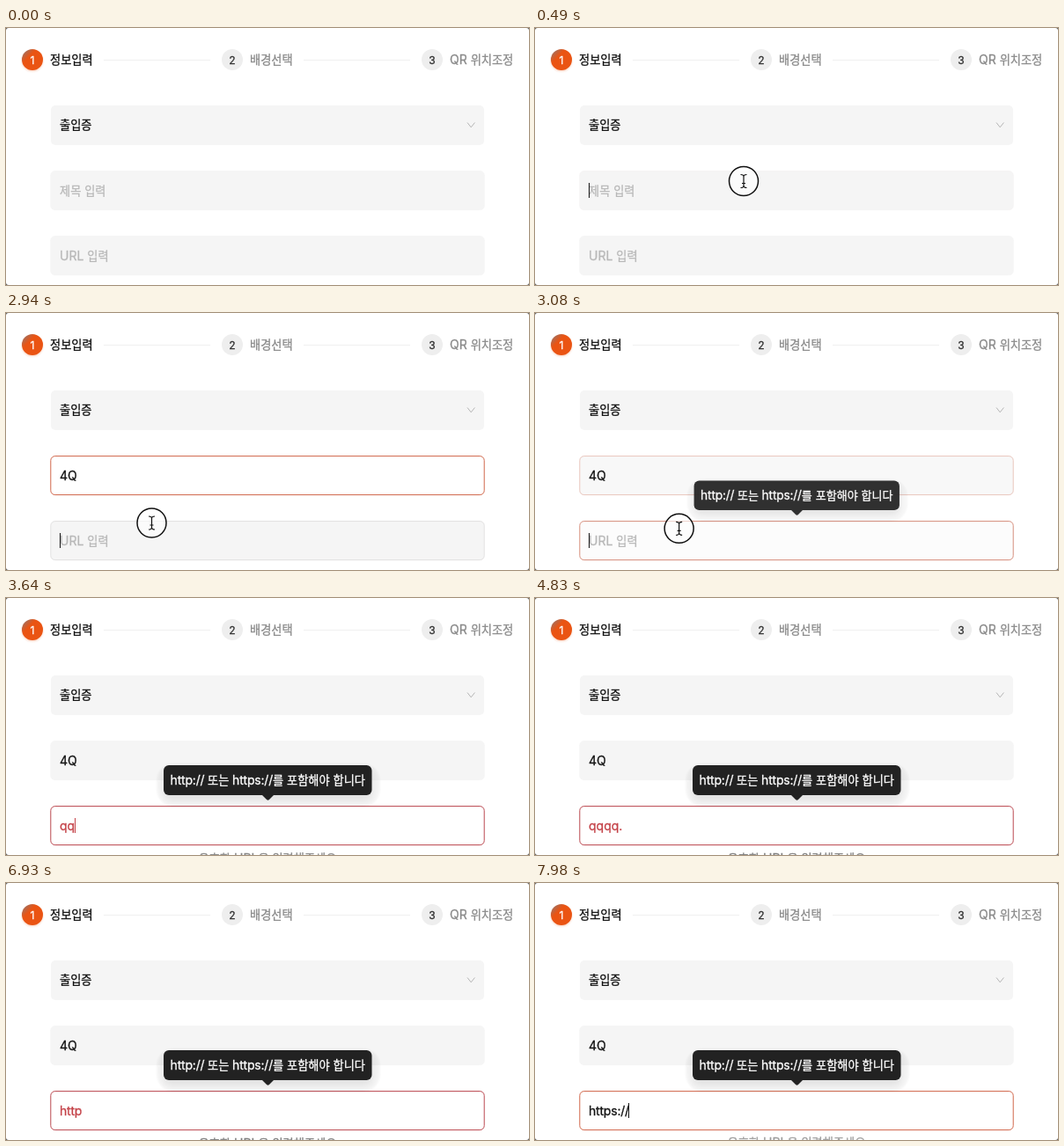
An HTML page for the animation above (8 s loop, 594 by 292 pixels).

```html
<!DOCTYPE html>
<html lang="ko">
<head>
<meta charset="utf-8">
<title>정보입력</title>
<style>
  html, body { margin: 0; width: 100%; height: 100%; overflow: hidden; background: #555; }
  svg { display: block; width: 594px; height: 292px; }
  text { font: 14px Inter, "Noto Sans CJK KR", sans-serif; white-space: pre; stroke-width: .3px; }
  .ko { font-family: "Noto Sans CJK KR", "Noto Sans CJK", sans-serif; font-size: 13.2px; }
  .url { letter-spacing: -0.2px; }
</style>
</head>
<body>
<svg id="stage" viewBox="0 0 594 292" xmlns="http://www.w3.org/2000/svg">
  <defs>
    <filter id="soft" x="-20%" y="-60%" width="140%" height="220%"><feGaussianBlur stdDeviation="4"/></filter>
    <filter id="glow" x="-50%" y="-50%" width="200%" height="200%"><feGaussianBlur stdDeviation="1"/></filter>
    <linearGradient id="badge" x1="0" y1="0" x2="1" y2="1">
      <stop offset=".1" stop-color="#a07060"/>
      <stop offset=".35" stop-color="#ea5413"/>
    </linearGradient>
  </defs>
  <rect width="594" height="292" rx="3" fill="#fff"/>
  <g id="steps"></g>
  <rect x="51" y="88" width="492" height="45" rx="5" fill="#f5f5f5"/>
  <path d="M524 107.5 L528.2 112.8 L532.4 107.5" fill="none" stroke="#b5b5b5"/>
  <g id="form"></g>
  <g id="tooltip">
    <rect x="171" y="188" width="254" height="49" rx="20" fill="#000" opacity=".035" filter="url(#glow)"/>
    <rect x="179" y="196" width="237" height="34" rx="8" fill="#000" opacity=".08" filter="url(#soft)"/>
    <path d="M290 223 H305 L299 229 Q297.5 230.4 296 229 Z" fill="#222"/>
    <rect x="179" y="190" width="236.5" height="34" rx="6" fill="#222"/>
  </g>
  <g id="cursor">
    <circle r="16.5" fill="#fff" fill-opacity=".6" stroke="#111" stroke-width="1.5"/>
    <path d="M-3.5 -7.5 Q0 -7.5 0 -5 Q0 -7.5 3.5 -7.5 M0 -5.5 V5.5 M-3.5 7.5 Q0 7.5 0 5 Q0 7.5 3.5 7.5 M-2 2.5 H2" fill="none" stroke="#111" stroke-width="1.2"/>
  </g>
</svg>
<script>
const LOOP = 8000;
const GRAY = [245, 245, 245], WHITE = [255, 255, 255], HOVER = [226, 226, 226];
const ORANGE = [208, 100, 72], RED = [186, 70, 78], INK = [20, 20, 20], RED_TEXT = [196, 66, 72];

const byId = id => document.getElementById(id);
const clamp = v => Math.max(0, Math.min(1, v));
const ramp = (t, from, to) => clamp((t - from) / (to - from));
const easeOut = p => 1 - (1 - p) ** 3;
const easeInOut = p => p * p * (3 - 2 * p);
const lerp = (a, b, p) => a + (b - a) * p;
const mix = (a, b, p) => a.map((v, i) => lerp(v, b[i], p));
const rgb = c => `rgb(${c.map(Math.round)})`;
const show = (node, on) => node.setAttribute('visibility', on ? 'visible' : 'hidden');

function make(parent, tag, attrs = {}) {
  const node = document.createElementNS('http://www.w3.org/2000/svg', tag);
  set(node, attrs);
  return parent.appendChild(node);
}

function set(node, attrs) {
  for (const name in attrs) node.setAttribute(name, attrs[name]);
}

// Hangul and Latin runs get their own font and size.
function setText(node, string) {
  if (node.dataset.value === string) return;
  node.dataset.value = string;
  node.replaceChildren();
  for (const run of string.match(/[가-힣]+|[^가-힣]+/g) || []) {
    const kind = /[가-힣]/.test(run) ? 'ko' : /http/.test(run) ? 'url' : '';
    make(node, 'tspan', { class: kind }).textContent = run;
  }
}

// The thin outline gives the type a medium weight.
function label(parent, string, x, y, color, anchor = 'start') {
  const node = make(parent, 'text', { x, y, fill: color, stroke: color, 'text-anchor': anchor });
  setText(node, string);
  return node;
}

function addStep(number, name, x, active) {
  const steps = byId('steps');
  if (active) make(steps, 'circle', { cx: x, cy: 37.2, r: 12, fill: '#e8540f', opacity: .25, filter: 'url(#glow)' });
  make(steps, 'circle', { cx: x, cy: 36, r: 12, fill: active ? 'url(#badge)' : '#eeeeee' });
  const digit = label(steps, number, x, 41, active ? '#fff' : '#333', 'middle');
  digit.style.fontSize = '12px';
  label(steps, name, x + 20, 40.6, active ? '#111' : '#8a8a8a');
}

function addField(y, hint) {
  const form = byId('form');
  return {
    box: make(form, 'rect', { x: 50.8, y: y + .6, width: 492.4, height: 44, rx: 5 }),
    hint: label(form, hint, 61, y + 27.6, '#b8b8b8'),
    value: make(form, 'text', { x: 61, y: y + 28 }),
    caret: make(form, 'rect', { y: y + 14, width: 1, height: 17 })
  };
}

addStep('1', '정보입력', 30, true);
addStep('2', '배경선택', 257, false);
addStep('3', 'QR 위치조정', 484, false);
for (const x of [111, 338]) make(byId('steps'), 'rect', { x, y: 36, width: 121, height: 1, fill: '#f0f0f0' });
label(byId('form'), '출입증', 61, 115.3, '#111');

const titleField = addField(162, '제목 입력');
const urlField = addField(236, 'URL 입력');
const message = label(byId('form'), '', 297, 301, '#808080', 'middle');
label(byId('tooltip'), 'http:// 또는 https://를 포함해야 합니다', 297.3, 212, '#fff', 'middle');

const titleKeys = [[1190, '4'], [1820, '4Q']];
const urlKeys = [
  [3360, 'q'], [3570, 'qq'], [3780, 'qqq'], [3990, 'qqqq'], [4340, 'qqqq.'],
  [4970, 'qqqq'], [5110, 'qq'], [5180, 'q'], [5320, ''],
  [6020, 'h'], [6230, 'htt'], [6440, 'http'], [7280, 'https'],
  [7490, 'https:'], [7700, 'https:/'], [7840, 'https://']
];
const caretGaps = [[1050, 1190], [1750, 1820], [2310, 2800], [4830, 5320], [5880, 6020], [6930, 7280]];
const cursorPaths = [
  [[70, 300, 234], [490, 237, 174], [700, 237, 176]],
  [[2520, 237, 176], [2590, 228, 167], [2940, 165.5, 238.5], [3150, 163, 247]]
];

const typed = (keys, t) => keys.reduce((text, [at, next]) => t >= at ? next : text, '');

function drawField(field, text, state) {
  const ink = rgb(state.ink);
  setText(field.value, text);
  set(field.value, { fill: ink, stroke: ink });
  show(field.hint, !text);
  set(field.box, { fill: rgb(state.fill), stroke: rgb(state.border) });
  show(field.caret, state.caret);
  const width = text ? field.value.getComputedTextLength() : 0;
  set(field.caret, { x: Math.floor(61 + width), fill: ink });
}

function drawCursor(t) {
  const path = t < 1190 ? cursorPaths[0] : cursorPaths[1];
  show(byId('cursor'), (t >= 70 && t < 1190) || (t >= 2520 && t < 3360));
  let [, x, y] = path[0];
  for (let i = 1; i < path.length; i++) {
    const p = easeInOut(ramp(t, path[i - 1][0], path[i][0]));
    x = lerp(x, path[i][1], p);
    y = lerp(y, path[i][2], p);
  }
  byId('cursor').setAttribute('transform', `translate(${x} ${y})`);
}

function drawMessage(t) {
  const empty = t >= 5320 && t < 6020;
  setText(message, empty ? 'URL을 입력해주세요' : '유효한 URL을 입력해주세요');
  const start = t < 5320 ? 3430 : empty ? 5320 : 6020;
  const enter = easeOut(ramp(t, start, start + (start === 3430 ? 350 : 210)));
  const leave = ramp(t, 7840, 8140);
  const shown = enter * (1 - leave * .5);
  set(message, { y: 301 - 5 * (1 - enter) - 3 * leave, opacity: t < 3430 ? 0 : shown });
}

function draw(t) {
  const caretOn = !caretGaps.some(([from, to]) => t >= from && t < to);
  const titleFocus = ramp(t, 490, 700) * (1 - ramp(t, 2940, 3150));
  const urlFocus = ramp(t, 2940, 3150);
  const error = ramp(t, 3360, 3570) * (1 - ramp(t, 7840, 7980));
  const hover = ramp(t, 2800, 2940);

  drawField(titleField, typed(titleKeys, t), {
    ink: INK,
    fill: mix(GRAY, WHITE, titleFocus),
    border: mix(GRAY, ORANGE, titleFocus),
    caret: caretOn && t >= 490 && t < 2940
  });
  drawField(urlField, typed(urlKeys, t), {
    ink: mix(INK, RED_TEXT, error),
    fill: mix(GRAY, WHITE, urlFocus),
    border: mix(mix(GRAY, HOVER, hover), mix(ORANGE, RED, error), urlFocus),
    caret: caretOn && t >= 2940
  });
  drawMessage(t);

  const pop = easeOut(ramp(t, 2980, 3150));
  const scale = lerp(.8, 1, pop);
  set(byId('tooltip'), {
    opacity: t < 3010 ? 0 : pop,
    transform: `translate(297.5 230) scale(${scale}) translate(-297.5 -230)`
  });
  drawCursor(t);
}

const began = performance.now();
function tick() {
  draw((performance.now() - began) % LOOP);
  requestAnimationFrame(tick);
}
tick();
</script>
</body>
</html>
```
